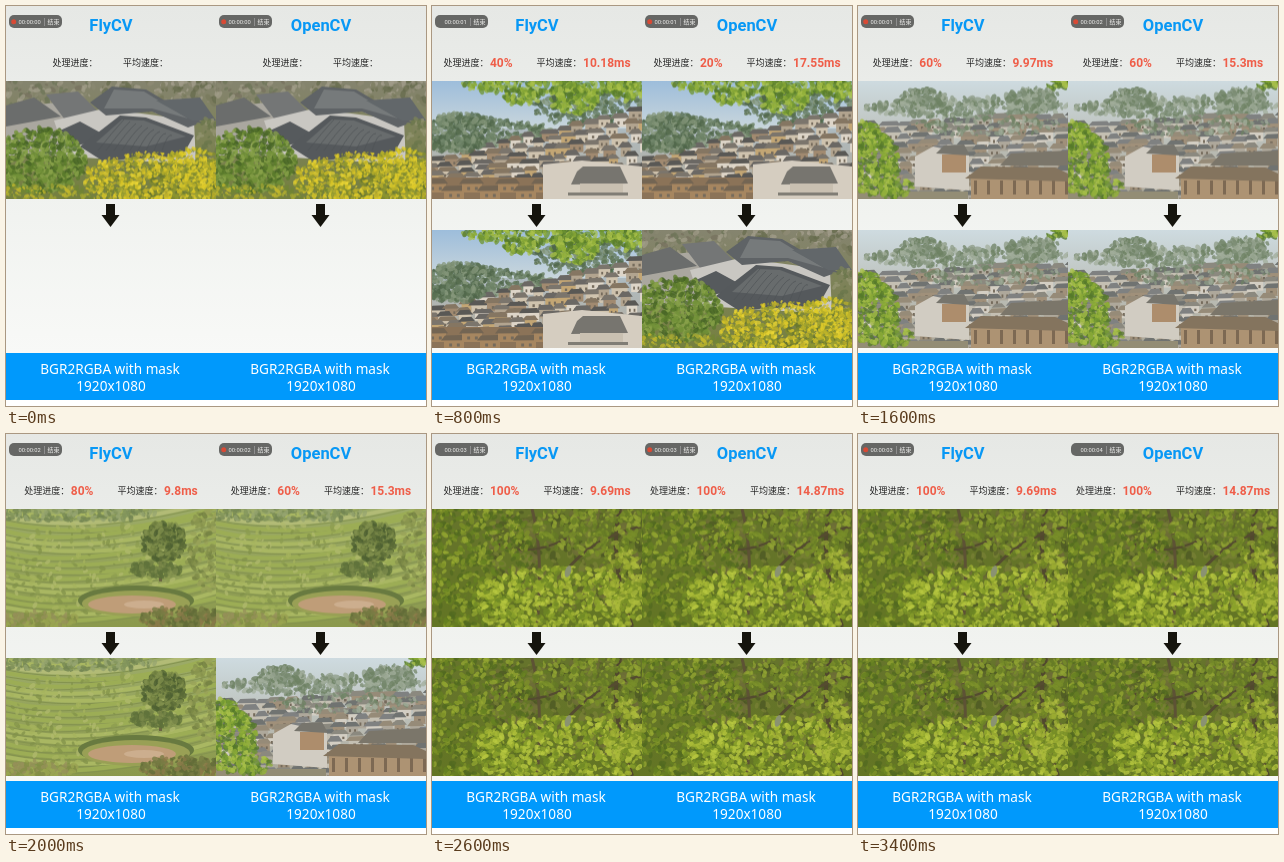
An HTML page with a canvas for the animation above (3600 ms loop, 420 by 400 pixels).

```html
<!DOCTYPE html>
<html lang="zh">
<head>
<meta charset="utf-8">
<style>
html, body { margin: 0; width: 100%; height: 100%; overflow: hidden; background: #fff; }
canvas { display: block; }
</style>
</head>
<body>
<canvas id="stage" width="420" height="400"></canvas>
<script>
const ctx = document.getElementById('stage').getContext('2d');
const LOOP = 3600, STEP = 200, PHOTO_W = 210, PHOTO_H = 118;
const LATIN = 'Roboto, sans-serif';
const CAPTION = '13.6px "Noto Sans", "Open Sans", sans-serif';
const CJK = '"Noto Sans CJK SC", "Noto Sans CJK", sans-serif';

const sides = [
  { title: 'FlyCV', x: 0, tick: 700, second: 950,
    loaded: [0, 600, 1200, 1800, 2400], done: [200, 800, 1400, 2000, 2600],
    speeds: [10.37, 10.18, 9.97, 9.8, 9.69] },
  { title: 'OpenCV', x: 210, tick: 200, second: 1000,
    loaded: [0, 800, 1400, 2000, 2400], done: [400, 1000, 1600, 2200, 2600],
    speeds: [17.55, 15.91, 15.3, 15.08, 14.87] }
];

function random(seed) {
  return () => {
    seed = (seed * 1664525 + 1013904223) >>> 0;
    return seed / 4294967296;
  };
}

// Simple landscapes, each painted once.
function painter(seed, paint) {
  const canvas = document.createElement('canvas');
  canvas.width = PHOTO_W;
  canvas.height = PHOTO_H;
  const g = canvas.getContext('2d');
  const rnd = random(seed);
  const p = {
    rect(x, y, w, h, color) { g.fillStyle = color; g.fillRect(x, y, w, h); },
    poly(color, ...pts) {
      g.fillStyle = color;
      g.beginPath();
      for (let i = 0; i < pts.length; i += 2) g.lineTo(pts[i], pts[i + 1]);
      g.fill();
    },
    oval(x, y, rx, ry, color, angle = 0) {
      g.fillStyle = color;
      g.beginPath();
      g.ellipse(x, y, rx, ry, angle, 0, 7);
      g.fill();
    },
    curve(color, width, x1, y1, cx, cy, x2, y2) {
      g.strokeStyle = color;
      g.lineWidth = width;
      g.beginPath();
      g.moveTo(x1, y1);
      g.quadraticCurveTo(cx, cy, x2, y2);
      g.stroke();
    },
    fade(y, h, top, bottom) {
      const f = g.createLinearGradient(0, y, 0, y + h);
      f.addColorStop(0, top);
      f.addColorStop(1, bottom);
      p.rect(0, y, PHOTO_W, h, f);
    },
    pick: list => list[Math.floor(rnd() * list.length)],
    // Translucent leaf-like dabs filling an ellipse.
    dabs(n, x, y, rx, ry, size, colors) {
      g.globalAlpha = 0.75;
      for (let i = 0; i < n; i++) {
        const a = rnd() * 6.283, r = Math.sqrt(rnd()), s = size * (0.5 + rnd());
        p.oval(x + rx * r * Math.cos(a), y + ry * r * Math.sin(a), s, s * 0.6, p.pick(colors), rnd() * 3);
      }
      g.globalAlpha = 1;
    },
    house(x, y, w, h, wall, roof) {
      p.rect(x + 2, y, w - 4, h, wall);
      p.rect(x + w * 0.3, y + h * 0.45, w * 0.12, h * 0.3, '#756b5c');
      p.rect(x + w * 0.62, y + h * 0.45, w * 0.12, h * 0.3, '#756b5c');
      p.poly(roof, x + 3, y - h * 0.35, x + w - 4, y - h * 0.4, x + w, y + h * 0.12, x - 1, y + h * 0.16);
    },
    // Rows of houses; the topmost rows climb to the right.
    village(top, slope, walls, roofs) {
      for (let y = top; y < 116; y += 7) {
        for (let x = -10 + rnd() * 8; x < 210; x += 11 + rnd() * 10) {
          const rise = Math.max(0, 1 - (y - top) / 60) * slope * (x - 60) / 140;
          p.house(x, y - rise + rnd() * 4, 13 + rnd() * 10, 8 + rnd() * 3, p.pick(walls), p.pick(roofs));
        }
      }
    }
  };
  paint(p);
  return canvas;
}

const fresh = ['#8fae38', '#6d9431', '#a8c04a', '#557a2b'];
const hills = ['#6f8468', '#5b7253', '#86977b', '#4f6549'];
const haze = ['#8c9b86', '#798b72', '#a2ae9b', '#6d8163'];

const photos = [
  painter(11, p => {
    p.fade(0, PHOTO_H, '#85846f', '#75803f');
    p.dabs(220, 165, 8, 70, 24, 3, ['#78795c', '#8f8b75', '#656b4c', '#a39d8c']);
    p.dabs(150, 30, 10, 60, 20, 3, ['#8a8872', '#6e7558', '#a09c88', '#77725f']);
    p.poly('#aaa79f', 0, 28, 50, 22, 95, 40, 95, 75, 0, 75);
    p.poly('#6b6d6c', 0, 25, 28, 17, 55, 36, 0, 46);
    p.poly('#747676', 40, 14, 72, 11, 95, 34, 58, 38);
    p.poly('#c9c7c2', 48, 40, 98, 28, 188, 40, 190, 84, 60, 76);
    p.poly('#5f6366', 84, 22, 106, 6, 140, 9, 196, 42, 182, 47, 146, 31, 100, 35);
    p.poly('#767a7b', 108, 9, 138, 11, 182, 38, 146, 28, 98, 28);
    p.poly('#565a5d', 54, 50, 74, 41, 96, 53, 92, 62, 66, 65);
    p.poly('#55595c', 74, 66, 114, 35, 140, 37, 188, 55, 176, 76, 96, 80);
    p.poly('#686c6d', 90, 62, 116, 39, 138, 40, 180, 56, 140, 66);
    for (let i = 0; i < 9; i++) p.curve('#505457', 0.7, 118 + i * 6, 39 + i * 2, 106 + i * 7, 52, 92 + i * 8, 70);
    p.poly('#62676a', 150, 20, 194, 17, 210, 40, 186, 40);
    p.dabs(50, 203, 60, 12, 24, 3, ['#7d8458', '#69754b', '#949471']);
    p.dabs(800, 34, 80, 46, 32, 2.7, ['#5b7b2c', '#73923a', '#486527', '#88a24a']);
    p.dabs(320, 165, 101, 72, 22, 3, ['#828a2c', '#a3a532', '#69782e']);
    p.dabs(760, 150, 99, 74, 28, 2.2, ['#dbc727', '#e8d436', '#bdb02a', '#8e9630']);
    p.dabs(250, 188, 90, 32, 22, 2.2, ['#dfcc2a', '#bbb12a', '#818c31']);
    p.dabs(160, 50, 112, 70, 8, 2.2, ['#c6b92c', '#a2a436', '#728436']);
  }),
  painter(23, p => {
    p.fade(0, PHOTO_H, '#a9c5dc', '#b5ab98');
    p.fade(0, 48, '#9dbddb', '#c9d6dc');
    p.dabs(380, 45, 52, 75, 14, 3, hills);
    p.dabs(120, 30, 40, 25, 8, 3, hills);
    p.dabs(240, 160, 28, 60, 18, 3, hills);
    p.village(62, 34, ['#cfc3ae', '#b2a48f', '#ddd5c8', '#a18a70', '#c3a674'], ['#6b6864', '#7b756c', '#595855', '#857662']);
    p.dabs(160, 22, 63, 30, 8, 3, hills);
    p.rect(0, 97, 112, 21, '#8b7358');
    for (let i = 0; i < 7; i++) p.house(i * 18 - 8, 102 + i % 2 * 7, 24, 10, '#a68660', '#736553');
    p.poly('#d5cdc0', 111, 84, 150, 80, 210, 86, 210, 118, 111, 118);
    p.poly('#77756f', 145, 91, 151, 86, 188, 86, 196, 103, 139, 104);
    p.rect(148, 103, 43, 9, '#c9c0b1');
    p.rect(136, 112, 60, 3, '#807d75');
    p.dabs(420, 120, 4, 90, 11, 2.8, fresh);
    p.dabs(180, 142, 18, 24, 15, 2.8, fresh);
    p.dabs(70, 90, 16, 18, 8, 2.8, fresh);
    p.dabs(80, 195, 10, 16, 10, 2.8, fresh);
  }),
  painter(37, p => {
    p.fade(0, PHOTO_H, '#cedbe0', '#aaa594');
    p.dabs(320, 110, 27, 105, 10, 3, haze);
    p.dabs(160, 65, 19, 24, 10, 3, haze);
    p.dabs(150, 175, 18, 28, 11, 3, haze);
    p.village(40, 7, ['#c4bfb2', '#aea89b', '#d3cec3', '#a0907a'], ['#7f8181', '#8b897f', '#707371', '#968b78']);
    p.dabs(110, 130, 45, 75, 10, 2.5, haze);
    p.poly('#d1ccc2', 57, 76, 75, 66, 111, 74, 111, 110, 57, 106);
    p.rect(84, 74, 24, 18, '#ad8d6c');
    p.poly('#77756d', 78, 73, 86, 65, 106, 64, 112, 75);
    p.rect(113, 97, 97, 21, '#ad9373');
    for (let x = 116; x < 210; x += 13) p.rect(x, 100, 3, 14, '#7d6953');
    p.poly('#84745e', 107, 98, 123, 86, 197, 87, 210, 93, 210, 101);
    p.poly('#7b766a', 142, 85, 153, 73, 210, 70, 210, 85);
    p.rect(0, 111, 110, 7, '#938d75');
    p.dabs(450, 12, 82, 29, 32, 2.8, fresh);
    p.dabs(120, 6, 55, 20, 14, 2.8, fresh);
    p.dabs(70, 38, 107, 18, 10, 2.8, fresh);
    p.dabs(35, 200, 3, 13, 6, 2.8, fresh);
  }),
  painter(49, p => {
    p.fade(0, PHOTO_H, '#9cab68', '#8b994d');
    for (let i = 0; i < 16; i++) {
      const y = i * 7, bend = 55 + i % 3 * 25;
      p.curve(p.pick(['#a9b762', '#9cad55', '#b2bb76']), 4, -5, y, bend, y + 22, 220, y - 18);
      p.curve('#84934f', 1, -5, y + 4, bend, y + 24, 220, y - 14);
    }
    p.dabs(240, 60, 5, 90, 8, 2.5, ['#82945c', '#95a470', '#738653']);
    p.dabs(260, 85, 60, 100, 45, 2.5, ['#8c9c50', '#a5b35e', '#b0b96d', '#81914a']);
    p.dabs(160, 205, 40, 24, 42, 3, ['#87934e', '#98a158', '#727f42']);
    p.oval(130, 92, 58, 15, '#687a40');
    p.oval(130, 95, 54, 13, '#99a055');
    p.oval(126, 96, 44, 9, '#bf9d78');
    p.oval(138, 96, 20, 4, '#ccae8e');
    p.dabs(240, 180, 110, 45, 11, 3, ['#757b43', '#89794a', '#616c38']);
    p.dabs(140, 31, 111, 42, 8, 3, ['#818e45', '#95905a', '#9ba651']);
    p.rect(153, 48, 3, 25, '#6b6642');
    p.dabs(380, 158, 33, 22, 19, 2.8, ['#5c6c38', '#718142', '#4c5f31', '#82904e']);
    p.dabs(120, 150, 61, 26, 7, 3, ['#5f713b', '#7a8849']);
  }),
  painter(61, p => {
    p.fade(0, PHOTO_H, '#66742c', '#637524');
    p.dabs(420, 145, 40, 90, 60, 4, ['#59622a', '#6d6c38', '#4c5724', '#788035']);
    p.curve('#51482e', 4, 188, 0, 176, 50, 200, 118);
    p.curve('#5d5235', 3, 100, 0, 112, 45, 105, 118);
    p.curve('#544b30', 3, 132, 65, 160, 28, 210, 18);
    p.curve('#544b30', 2, 65, 35, 95, 50, 135, 30);
    p.dabs(900, 38, 50, 62, 73, 2.8, ['#7e9228', '#95a832', '#658022', '#526a20']);
    p.dabs(340, 160, 19, 58, 28, 2.8, ['#91a433', '#788e2a', '#647925']);
    p.dabs(880, 128, 94, 88, 36, 2.8, ['#a7b835', '#b9c942', '#8ba22b', '#6f8825']);
    p.dabs(180, 191, 70, 23, 33, 2.8, ['#9cac33', '#778e27', '#adbc3e']);
    p.oval(136, 63, 3, 6, '#8a9272', 0.3);
  })
];

function text(str, x, y, font, color, align = 'left') {
  ctx.font = font;
  ctx.fillStyle = color;
  ctx.textAlign = align;
  ctx.fillText(str, x, y);
}

function drawTimer(side, t) {
  const sec = Math.max(0, 1 + (t - side.tick) / side.second);
  ctx.fillStyle = '#666765';
  ctx.beginPath();
  ctx.roundRect(3, 9, 53, 13, 5);
  ctx.fill();
  if (sec < 1 || sec % 1 > 0.38) {
    ctx.fillStyle = '#d84a35';
    ctx.beginPath();
    ctx.arc(7.7, 15.7, 2.5, 0, 7);
    ctx.fill();
  }
  text('00:00:0' + Math.floor(sec), 12.5, 17.9, '5.8px ' + LATIN, '#f2f2f0');
  ctx.fillStyle = '#999';
  ctx.fillRect(38, 12, 0.8, 8);
  text('结束', 41.5, 17.9, '6px ' + CJK, '#f2f2f0');
}

function drawStats(count, speed) {
  const labelFont = '9px ' + CJK, valueFont = 'bold 12px ' + LATIN;
  const parts = [
    ['处理进度：', labelFont, '#242424', 1.5],
    [count ? count * 20 + '%' : '', valueFont, '#ef5e49', 24],
    ['平均速度：', labelFont, '#242424', 1.5],
    [count ? speed + 'ms' : '', valueFont, '#ef5e49', 0]
  ];
  const widths = parts.map(([str, font, , gap]) => {
    ctx.font = font;
    return ctx.measureText(str).width + gap;
  });
  let x = 105 - widths.reduce((a, b) => a + b) / 2;
  parts.forEach(([str, font, color], i) => {
    text(str, x, font === labelFont ? 59.6 : 61, font, color);
    x += widths[i];
  });
}

function drawArrow() {
  ctx.fillStyle = '#15140d';
  ctx.fillRect(100, 198, 9, 12);
  ctx.beginPath();
  ctx.moveTo(95.5, 209);
  ctx.lineTo(113.5, 209);
  ctx.lineTo(104.5, 221);
  ctx.fill();
}

function drawSide(side, t) {
  const reached = times => times.filter(time => time <= t).length;
  const count = reached(side.done);
  ctx.save();
  ctx.translate(side.x, 0);
  drawTimer(side, t);
  text(side.title, 105, 25, 'bold 16.5px ' + LATIN, '#0898f5', 'center');
  drawStats(count, side.speeds[count - 1]);
  ctx.drawImage(photos[reached(side.loaded) - 1], 0, 74.5);
  drawArrow();
  if (count) ctx.drawImage(photos[count - 1], 0, 224);
  ctx.fillStyle = '#0099fc';
  ctx.fillRect(0, 347, 210, 47);
  text('BGR2RGBA with mask', 104, 368, CAPTION, '#fff', 'center');
  text('1920x1080', 105, 384.5, CAPTION, '#fff', 'center');
  ctx.restore();
}

const backdrop = ctx.createLinearGradient(0, 0, 0, 347);
backdrop.addColorStop(0, '#e6e8e5');
backdrop.addColorStop(0.55, '#f0f2ef');
backdrop.addColorStop(1, '#f8f9f7');

const start = performance.now();
function frame(now) {
  const t = Math.floor(Math.max(0, now - start) % LOOP / STEP) * STEP;
  ctx.fillStyle = '#fff';
  ctx.fillRect(0, 0, 420, 400);
  ctx.fillStyle = backdrop;
  ctx.fillRect(0, 0, 420, 347);
  sides.forEach(side => drawSide(side, t));
  requestAnimationFrame(frame);
}
frame(start);
</script>
</body>
</html>
```
